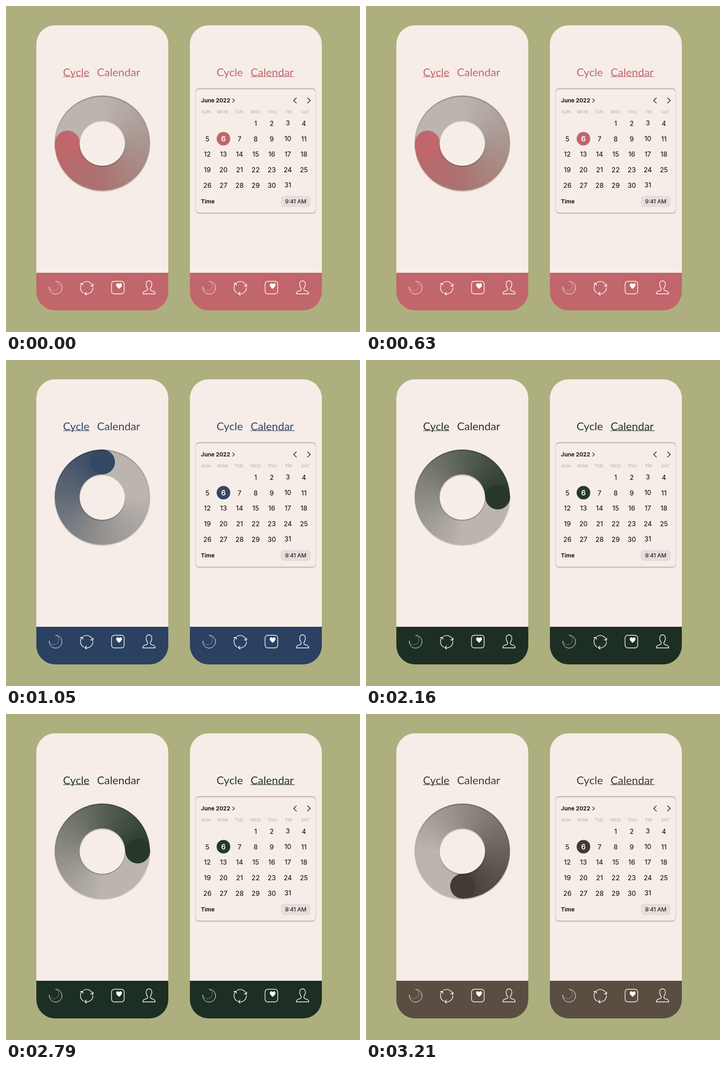
An HTML page that plays this animation: 770x710 px, repeating every 4260 ms.

```html
<!DOCTYPE html>
<html lang="en">
<head>
<meta charset="utf-8">
<title>Cycle and calendar</title>
<style>
html, body { margin: 0; width: 100%; height: 100%; overflow: hidden; background: #adaf7e; }
div, svg { position: absolute; box-sizing: border-box; }
.phone { top: 42px; width: 286.5px; height: 620.5px; border-radius: 41px;
  background: linear-gradient(#f6ede8 539px, var(--bar) 539px); }
.ring, .ring div { border-radius: 50%; }
.ring { left: 106px; top: 195px; width: 207px; height: 207px;
  background: conic-gradient(from var(--head), #bbb4af 90deg, var(--m1) 180deg, var(--m2) 270deg, var(--ink) 360deg);
  box-shadow: 0 2px 2px #0004; }
.cap { left: 76.5px; width: 54px; height: 54px; background: var(--ink);
  transform-origin: 27px 103.5px; transform: rotate(var(--head)); }
.edge { inset: 0; box-shadow: inset 0 2px 2px #0004; }
.hole { inset: 54px; background: #f6ede8; box-shadow: inset 0 2px 2px #0004, 0 2px 2px #0004; }
.card { left: 412px; top: 179px; width: 262px; height: 271px; border-radius: 8px;
  background: #f6ede8; box-shadow: inset 0 2px 2px #0004, 0 2px 2px #0004; }
svg { left: 0; top: 0; font-family: Inter, sans-serif; }
.tabs { font: 24px Lato, sans-serif; fill: var(--ink); }
.strong { font-size: 12.3px; font-weight: 600; }
.week { font-size: 9.5px; font-weight: 600; fill: #c5bdb9; text-anchor: middle; }
.days { font-size: 14.6px; text-anchor: middle; }
.today { font-size: 15.5px; font-weight: 600; fill: #fff; }
.line { fill: none; stroke: #fff; stroke-width: 1.4; stroke-linecap: round; stroke-linejoin: round; }
</style>
</head>
<body>
<div class="phone" style="left:66px"></div>
<div class="phone" style="left:400px"></div>
<div class="ring"><div class="cap"></div><div class="edge"></div><div class="hole"></div></div>
<div class="card"></div>
<svg width="770" height="710">
  <defs>
    <path id="arrow" d="M-3.7-13A13.5 13.5 0 0 1 13.5 0M9.3-2.2 13.5.6 15.7-4"/>
    <g id="icons" class="line">
      <path stroke-width="1" style="stroke-width:1" d="M108 599.5A14 14 0 1 1 94 612"/>
      <path style="stroke-width:1" stroke-dasharray=".5 2.3" d="M108 599.5A10.6 10.6 0 1 1 94 612"/>
      <g transform="translate(175.5 613.5)">
        <use href="#arrow" transform="rotate(-14)"/>
        <use href="#arrow" transform="rotate(106)"/>
        <use href="#arrow" transform="rotate(226)"/>
      </g>
      <rect x="229.5" y="599.5" width="27.5" height="27.5" rx="6"/>
      <path fill="#fff" stroke="none" style="stroke:none" d="M246 616C243 613 239.7 611 239.7 607.4C239.7 603.6 244.5 602.8 246 606C247.5 602.8 252.3 603.6 252.3 607.4C252.3 611 249 613 246 616Z"/>
      <path d="M297.5 627C297.5 621 303 621 306.5 619.5C309 618 308.5 615.5 306.8 613C305 610.5 304.7 608 304.7 605.5A6.3 7 0 0 1 317.3 605.5C317.3 608 317 610.5 315.2 613C313.5 615.5 313 618 315.5 619.5C319 621 324.5 621 324.5 627Z"/>
    </g>
  </defs>
  <use href="#icons"/>
  <use href="#icons" x="334"/>
  <g class="tabs">
    <text x="124" y="153">Cycle</text><text x="198" y="153">Calendar</text>
    <text x="458" y="153">Cycle</text><text x="532" y="153">Calendar</text>
    <rect x="124.5" y="153.3" width="57" height="1.2"/><rect x="532" y="153.3" width="96" height="1.2"/>
  </g>
  <text class="strong" x="424" y="210">June 2022</text>
  <text class="strong" x="424" y="430">Time</text>
  <g fill="none" stroke="#333" stroke-width="1.7">
    <path stroke-width="1.4" d="M492.5 201.5 497 205.7 492.5 210"/>
    <path d="M632 199.5 625.7 205.8 632 212M655.5 199.5 661.8 205.8 655.5 212"/>
  </g>
  <rect x="598" y="413.5" width="64.5" height="24.5" rx="6" fill="#e7dedb"/>
  <text x="630" y="430" font-size="12.1" text-anchor="middle">9:41 AM</text>
  <circle cx="473" cy="289" r="14.8" fill="var(--ink)"/>
  <g id="week" class="week"></g>
  <g id="days" class="days"></g>
</svg>
<script>
const LOOP = 4260;
const phases = [
  { start: 0, head: 270, bar: '#c1666b', ink: '#c1666b', m1: '#a8968f', m2: '#ab7371' },
  { start: 1050, head: 0, bar: '#2b4162', ink: '#344764', m1: '#949290', m2: '#616a75' },
  { start: 2160, head: 90, bar: '#1d2f24', ink: '#27382b', m1: '#8d8b84', m2: '#596056' },
  { start: 3210, head: 180, bar: '#5a4e42', ink: '#433a34', m1: '#928a83', m2: '#69615a' }
];

const label = (x, y, text, cls = '') => `<text class="${cls}" x="${x}" y="${y}">${text}</text>`;

week.innerHTML = ['SUN', 'MON', 'TUE', 'WED', 'THU', 'FRI', 'SAT']
  .map((name, i) => label(435 + 36 * i, 234, name)).join('');

let cells = '';
for (let day = 1; day <= 31; day++) {
  const col = (day + 2) % 7, row = Math.floor((day + 2) / 7);
  const y = 260.8 + 33.8 * row - (col === 5 ? 0.7 : 0);
  cells += label(438 + 35 * col, y, day, day === 6 ? 'today' : '');
}
days.innerHTML = cells;

const root = document.documentElement.style;
const begin = performance.now();
let shown;

function draw() {
  const t = (performance.now() - begin) % LOOP;
  const phase = phases.findLast(p => t >= p.start);
  if (phase !== shown) {
    shown = phase;
    for (const key of ['bar', 'ink', 'm1', 'm2']) root.setProperty('--' + key, phase[key]);
    root.setProperty('--head', phase.head + 'deg');
  }
  requestAnimationFrame(draw);
}
draw();
</script>
</body>
</html>
```
